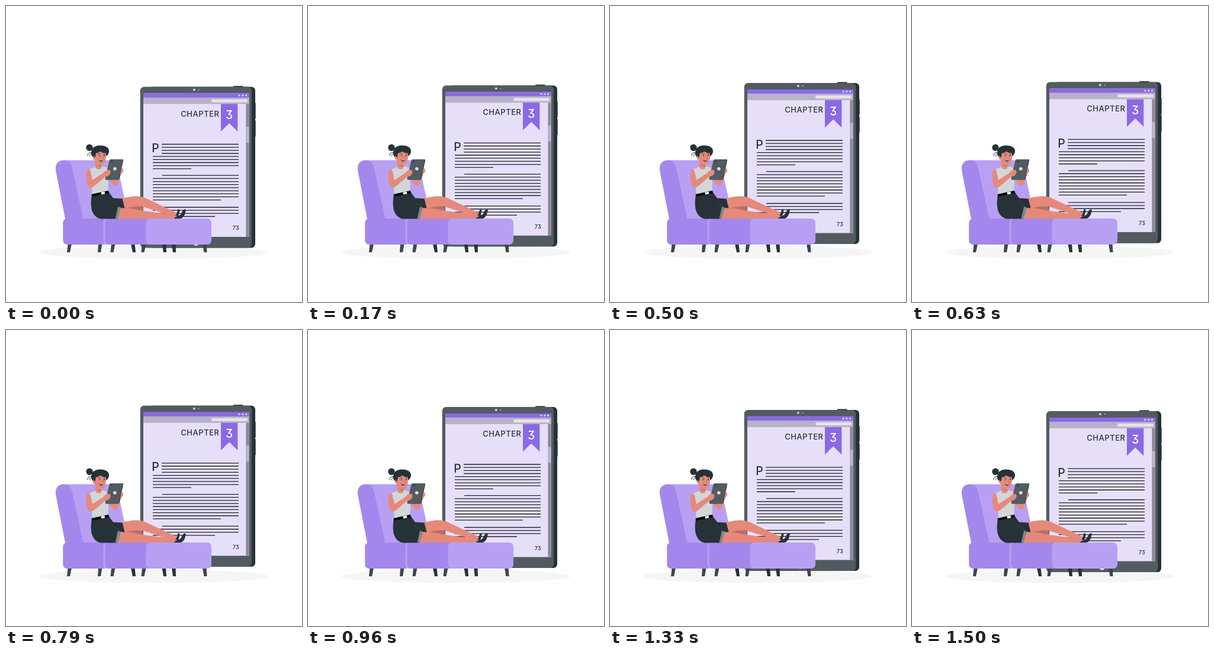
An HTML page that plays this animation: 500x500 px, repeating every 1.54 s.

```html
<!DOCTYPE html>
<html lang="en">
<head>
<meta charset="utf-8">
<title>Reading on the couch</title>
<style>
html, body { margin: 0; width: 100%; height: 100%; overflow: hidden; background: #fff; }
svg { display: block; width: 100vw; height: 100vh; }
text { font-family: Inter, "Open Sans", sans-serif; font-weight: 500; font-feature-settings: "cv09"; fill: #263238; }
.ink { fill: #263238; }
.slate { fill: #525c60; }
.violet { fill: #8b69e6; }
.deep { fill: #a487ec; }
.lilac { fill: #b7a0f3; }
.skin { fill: #e58a7b; }
.shade { fill: #b96f64; }
</style>
</head>
<body>
<svg viewBox="0 0 500 500">
  <ellipse cx="249.5" cy="416" rx="193.5" ry="11.3" fill="#f5f5f5"/>

  <g id="tablet">
    <g class="ink">
      <rect x="384" y="135" width="16.5" height="4" rx="1"/>
      <rect x="417" y="163.5" width="4.7" height="27" rx="1"/>
      <rect x="417" y="193" width="4.7" height="27.500" rx="1"/>
      <rect x="240" y="136.500" width="181" height="272" rx="6.500"/>
    </g>
    <rect class="slate" x="226.700" y="136.500" width="188.500" height="272" rx="6.500"/>
    <circle cx="317.800" cy="141.500" r="1.900" fill="#d5d8d9"/>
    <circle cx="325.500" cy="141.700" r=".9" fill="#d5d8d9"/>
    <circle cx="321" cy="400" r="5" fill="#f0f0f0"/>
    <rect x="232" y="147.500" width="178.500" height="242.500" fill="#e6dff9"/>
    <rect class="violet" x="232" y="147.500" width="178.500" height="7.500"/>
    <rect x="232" y="154.700" width="178.500" height="10.800" fill="#b8b2c7"/>
    <rect x="347" y="157.400" width="61" height="5.300" rx="2.400" fill="#e5e3e9"/>
    <rect x="405.300" y="165.500" width="5.200" height="224.500" fill="#8f8a9b"/>
    <rect x="405.300" y="204" width="5.200" height="27" fill="#bcb5cb"/>
    <g fill="#d8ccf8">
      <circle cx="394" cy="151" r="1.700"/>
      <circle cx="399.800" cy="151" r="1.700"/>
      <circle cx="405.500" cy="151" r="1.700"/>
    </g>
    <path class="violet" d="M363 165.500H391.300V212L377.200 198L363 212Z"/>
    <text x="295.200" y="186.600" font-size="12.900" letter-spacing=".62">CHAPTER</text>
    <text x="377.200" y="191" font-size="19.500" text-anchor="middle" style="fill:#fff">3</text>
    <text x="246.200" y="247" font-size="19.500">P</text>
    <text x="388.300" y="378.300" font-size="9.300" text-anchor="middle">73</text>
    <path id="lines" fill="none" stroke="#20242c" stroke-width="1.300"/>
  </g>

  <g id="legs"></g>

  <!-- armchair back and seat -->
  <path class="lilac" d="M98 260.500H176Q186 260.500 188.500 271L208 362H110Z"/>
  <path class="deep" d="M84.300 279C82 266 89 260.500 98 260.500Q108.500 261 111.500 272L131 362H100.500Z"/>
  <rect class="deep" x="96.200" y="359" width="76" height="44" rx="7"/>
  <rect class="lilac" x="164.500" y="359.500" width="16" height="43.500" rx="6"/>
  <rect class="deep" x="167.500" y="359" width="80" height="44" rx="7"/>

  <!-- reader -->
  <path class="skin" d="M181 274Q192 270 197.500 275Q199 279 194.500 284L188 302Q185 305 181 302L171 291L176 285Z"/>
  <path class="shade" d="M195 338Q214 334 230 338L232 346L190 349Z"/>
  <path class="skin" d="M194 326Q212 320.500 224 321.500Q231 322 240 326.500L292 351L288 357L230 338.500Q217 337 197 343Z"/>
  <path class="shade" d="M262 349.500L288 355.500L285 358L250 351Z"/>
  <path class="ink" d="M278 357.500Q284 356 287.500 352.500L290.500 343.500Q293 342.500 293.500 345.500L291.500 354Q290 359 283 359Z"/>
  <path class="skin" d="M188 340Q206 340 225 345L284 353L291 355.500L288 359.200H186Z"/>
  <path class="ink" d="M283 359.200Q287 355 291 354.500Q295 353.500 297 348.500Q300 342 304 344L302 352Q299 359.500 291 359.500Z"/>
  <path class="ink" d="M145 319L174 315L181 324.500L196.500 325.500L200.500 341.500L193 341L187.500 359.500H160Q148 357 144.500 343Q142.500 332 145 319Z"/>
  <path d="M189 339L194 340.500L188.500 359.300H184.500Z" fill="#7d8789"/>
  <path d="M179 329Q183 335 193 339" fill="none" stroke="#46535a" stroke-width=".7"/>

  <path class="skin" d="M150 260H162L161 274L165 279Q154 284 146 276L151 272Z"/>
  <path class="shade" d="M153 267Q157 270.500 161.500 269.500L161 271.500Q156 272 153 267Z"/>
  <path d="M140 276Q146 274 150.500 271.500Q153 278 161 274.500V271Q171 271 173.500 277L172.500 313L145.500 318.500Q146 303 142 291Z" fill="#d3d6d7"/>
  <path d="M144.700 318L173 311.800L174 316L145 322Z"/>
  <path d="M160.500 314.700L166.500 313.400L167.300 317.200L161 318.500Z" fill="#fff"/>
  <path class="skin" d="M137 276.500Q142 273.500 143.500 282L146 294L166 281Q171 275.500 177 277.500L178 282Q175 288 167.500 288.500L148 305Q140 309.500 137.500 302Q135 290 136 280Z"/>

  <path class="ink" d="M177 259.300H197Q198.500 259.300 198 261L191.500 291.500Q191 293.500 189 293.500H169.500Q167.500 293.500 168 291.500L175 261Q175.400 259.300 177 259.300Z"/>
  <path class="slate" d="M176.500 259.300H195.500Q197.500 259.300 197 261L190.500 291.500Q190 293.200 188.300 293.200H169Q167 293.200 167.500 291.500L174.500 261Q175 259.300 176.500 259.300Z"/>
  <circle cx="183.800" cy="275" r="2.800" fill="#e0e2e3"/>
  <circle class="ink" cx="178.800" cy="262.800" r="1.300"/>
  <path class="skin" d="M165 281Q170 275.500 175 277Q177.500 279.500 176 283Q174 288 168 288Z"/>
  <path class="skin" d="M194.500 275Q198.500 275.500 198 279.500L193 284.500Z"/>

  <circle class="ink" cx="141" cy="239.300" r="5.700"/>
  <path class="ink" d="M144 246Q146 236.500 157 235.500Q172 235 174 244Q174.500 250 169 254L150 258Q143 254 144 246Z"/>
  <path class="skin" d="M150 249Q156 248.500 159 245.500Q164 249 168.500 248Q170 255 167.500 263Q165 269.500 159 268.500Q151.500 267 151 260Q146.500 260 146.500 255.500Q147 251.500 150.500 253Z"/>
  <path class="ink" d="M147 247L152 246L151 254.500L149 256Z"/>
  <path d="M145 247Q137 248 138 253M145 249Q140 251 142 254" fill="none" stroke="#263238" stroke-width="1"/>
  <ellipse class="ink" cx="158" cy="252.800" rx=".8" ry="1.200"/>
  <ellipse class="ink" cx="166" cy="252.300" rx=".8" ry="1.200"/>
  <path d="M155.500 250.200Q157.500 248.500 159.500 249.500M164.500 249.300Q166 248.500 167.500 249.500" fill="none" stroke="#263238" stroke-width=".8"/>
  <path d="M163 252.500L165 257H162.500" fill="none" stroke="#b96f64" stroke-width=".8"/>
  <path class="ink" d="M156.500 258.500Q160 260.300 164 258.700Q163.500 263 160.500 262.800Q157.500 262.500 156.500 258.500Z"/>
  <path d="M157 258.900Q160 260.300 163.600 259L163.200 260.200Q160 261.300 157.500 260Z" fill="#fff"/>

  <rect class="lilac" x="236.500" y="359" width="110.500" height="44" rx="7"/>
</svg>
<script>
const $ = id => document.getElementById(id);

// Paragraphs: first y, then runs of [count, left, right]
const GAP = 5.17;
const paragraphs = [
  [233.5, [4, 263, 393], [4, 248, 393], [1, 248, 313]],
  [286.2, [1, 264, 393], [7, 248, 393], [1, 248, 363]],
  [340, [1, 264, 393], [2, 248, 393], [1, 248, 353]]
];
let d = "";
for (const [top, ...runs] of paragraphs) {
  let y = top;
  for (const [count, left, right] of runs)
    for (let i = 0; i < count; i++, y += GAP) d += `M${left} ${y.toFixed(2)}H${right}`;
}
$("lines").setAttribute("d", d);

// Furniture legs: top x, foot x, dark
const legs = [
  [104.5, 103, 0], [156, 155, 0], [178, 176.5, 0], [211, 214, 1],
  [230, 228.5, 0], [263.5, 266, 1], [280, 282, 1], [332, 334.5, 0]
];
$("legs").innerHTML = legs.map(([a, b, dark]) =>
  `<path fill="${dark ? "#263238" : "#3a474d"}" d="M${a} 402H${a + 6.5}L${b + 5} 416H${b}Z"/>`).join("");

// The tablet floats up and down linearly, in 24 steps a second
const LOOP = 1540, STEPS = 37, RISE = 10;
function draw(ms) {
  const step = Math.min(STEPS - 1, Math.floor((ms % LOOP + 5) * 0.024 + 1e-6));
  const phase = (step + 1) / STEPS % 1;
  const lift = RISE * (1 - Math.abs(2 * phase - 1));
  $("tablet").setAttribute("transform", `translate(0 ${(0.54 - lift).toFixed(3)})`);
}

let start;
function tick(now) {
  start ??= now;
  draw(now - start);
  requestAnimationFrame(tick);
}
draw(0);
requestAnimationFrame(tick);
</script>
</body>
</html>
```
